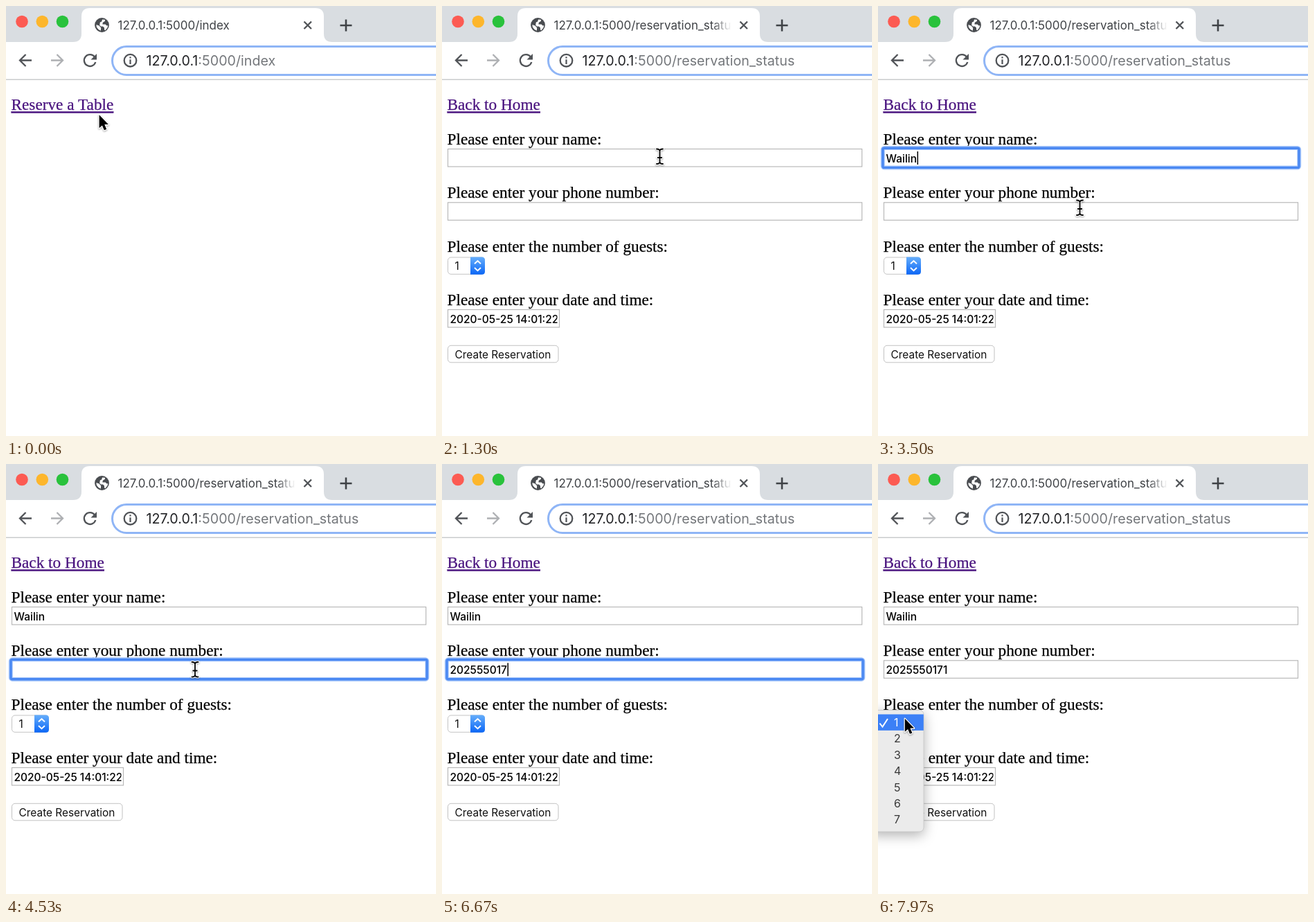
Recreate the animation shown at these times as an HTML page. Size 621 px wide and 621 px high, loop 8000 ms.

```html
<!DOCTYPE html>
<html lang="en">
<head>
<meta charset="utf-8">
<title>Reservation form</title>
<style>
  html, body { margin: 0; width: 100%; height: 100%; overflow: hidden; background: #fff; }
  svg { display: block; width: 100%; height: 100%; }
  text { white-space: pre; }
  .ui { font-family: Inter, "Open Sans", sans-serif; font-size: 15.4px; fill: #111; }
  .entry { font-size: 15.5px; font-weight: 500; fill: #000; }
  .page { font-family: "Liberation Serif", "Times New Roman", serif; font-size: 23.27px; fill: #000; stroke: #000; stroke-width: .25; }
  .link { fill: #4a147f; stroke: #4a147f; text-decoration: underline 1.5px; }
  .title { font-size: 17px; fill: #3f4246; }
  .url { font-size: 19.7px; fill: #202124; }
  .icon { fill: none; stroke: #505357; stroke-width: 2.3; }
  .field { fill: #fff; stroke: #b9b9b9; stroke-width: 1.2; }
  .menu text { font-size: 16px; fill: #3a3a3a; }
  .menu .panel { filter: drop-shadow(0 5px 9px rgba(0,0,0,.3)); }
  #cursor { filter: drop-shadow(0 1.5px 1.2px rgba(0,0,0,.35)); }
</style>
</head>
<body>
<svg viewBox="0 0 621 621" xmlns="http://www.w3.org/2000/svg">
  <defs>
    <linearGradient id="fade"><stop offset="0" stop-color="#fff" stop-opacity="0"/><stop offset=".5" stop-color="#fff"/></linearGradient>
    <linearGradient id="blue" x2="0" y2="1"><stop offset="0" stop-color="#66aefb"/><stop offset="1" stop-color="#0b66f6"/></linearGradient>
    <clipPath id="dateClip"><rect x="11" y="440" width="155.5" height="23"/></clipPath>
  </defs>
  <rect width="621" height="621" fill="#fff"/>

  <!-- tab strip -->
  <rect width="621" height="52" fill="#d9dde1"/>
  <circle cx="23" cy="22.5" r="8.8" fill="#fc5b53"/>
  <circle cx="52.3" cy="22.5" r="8.8" fill="#fdb62c"/>
  <circle cx="81.5" cy="22.5" r="8.8" fill="#29c23c"/>
  <path d="M97 52q12 0 12-12V15q0-12 12-12H447q12 0 12 12V40q0 12 12 12z" fill="#fff"/>
  <circle cx="138.5" cy="27.5" r="10.4" fill="#494c50"/>
  <path d="M139 19.5l4 .3-.2 2.2-3 1.8-.4 2.6h4.2l2 2 1.6-.4-.6 3-3 4-1.6-.4v-3l-2-2.2h-3l-1.8-2 .6-3.8 2.4-1.2zM130.4 27l4.2 1.6 2.6 3-.4 4.2-3.4-2-2.6-3.4z" fill="#fff"/>
  <text id="tabTitle" class="ui title" x="161.5" y="33.7"></text>
  <rect x="390" y="14" width="56" height="28" fill="url(#fade)"/>
  <path class="icon" d="M430.5 22.5l10.5 10.5m0-10.5l-10.5 10.5"/>
  <path class="icon" style="stroke:#3f4246;stroke-width:2.6" d="M482.5 28h17m-8.5-8.5v17"/>

  <!-- toolbar -->
  <path class="icon" d="M37 78.5H20m8.5-8.5L20 78.5l8.5 8.5"/>
  <path class="icon" style="stroke:#aeb0b3" d="M65 78.5h17m-8.5-8.5l8.5 8.5-8.5 8.5"/>
  <path class="icon" d="M128 73.5a8.4 8.4 0 1 0 1.3 7.5"/>
  <path d="M131 69v8.5h-8.5z" fill="#505357"/>
  <rect x="153.5" y="58.5" width="520" height="41" rx="20.5" fill="#fff" stroke="#8fb5f6" stroke-width="3"/>
  <circle class="icon" cx="179.5" cy="78.7" r="8.8"/>
  <path d="M178.4 73.3h2.2v2.3h-2.2zM178.4 77.3h2.2v6.7h-2.2z" fill="#505357"/>
  <text class="ui url" x="202.5" y="86">127.0.0.1<tspan id="urlPath" fill="#74777b"></tspan></text>
  <rect y="105.5" width="621" height="1.5" fill="#c9cbcd"/>

  <text id="link" class="page link" x="7.5" y="150.3"></text>

  <g id="form">
    <text class="page" x="7.5" y="200">Please enter your name:</text>
    <text class="page" x="7.5" y="277.3">Please enter your phone number:</text>
    <text class="page" x="7.5" y="354.6">Please enter the number of guests:</text>
    <text class="page" x="7.5" y="431.9">Please enter your date and time:</text>
    <rect class="field" x="8.5" y="206.5" width="598" height="25.5"/>
    <rect class="field" x="8.5" y="283.8" width="598" height="25.5"/>
    <rect class="field" x="8.5" y="438.5" width="161" height="25.5"/>
    <g id="ring" fill="none">
      <rect x="6.8" y="205" width="601.4" height="28.6" rx="2.5" stroke="#a9c8fa" stroke-width="6"/>
      <rect x="7" y="205.2" width="601" height="28.2" rx="2" stroke="#4a88f2" stroke-width="3.4"/>
    </g>
    <text id="name" class="ui entry" x="11.5" y="226"></text>
    <text id="phone" class="ui entry" x="11.5" y="303.3"></text>
    <rect id="caret" width="1.5" height="19" fill="#000"/>
    <text class="ui entry" x="11.5" y="458" clip-path="url(#dateClip)">2020-05-25 14:01:22</text>

    <rect x="8.5" y="363" width="53" height="24.3" rx="4.5" fill="#fff" stroke="#c4c4c4"/>
    <path d="M41 362.5h16.5q4.5 0 4.5 4.5v16.3q0 4.5-4.5 4.5H41z" fill="url(#blue)"/>
    <path d="M47 372.3l4.5-4.3 4.5 4.3M47 378l4.5 4.3 4.5-4.3" fill="none" stroke="#fff" stroke-width="1.9"/>
    <text class="ui" x="18.5" y="381">1</text>

    <rect x="8.5" y="490.3" width="159.5" height="24.5" rx="4.5" fill="#fff" stroke="#c2c2c2"/>
    <text class="ui" x="18.6" y="508.7">Create Reservation</text>
  </g>

  <g id="menu" class="menu">
    <rect class="panel" x="-12" y="355.5" width="78" height="175.5" rx="6" fill="#ebebeb" stroke="#c6c6c6" stroke-width=".8"/>
    <rect y="361.5" width="65.8" height="23.3" fill="#3c80f6"/>
    <path d="M2.5 374.5l4 5L14 368" fill="none" stroke="#fff" stroke-width="2"/>
  </g>

  <g id="cursor">
    <path id="arrow" d="M0 0V19L4.3 15.2 7.2 22 10.6 20.6 7.7 13.8H13.3Z" stroke="#fff" stroke-width="2.6" stroke-linejoin="round" paint-order="stroke"/>
    <g id="beam" fill="none" stroke-linecap="round">
      <path id="beamShape" d="M-4.5-10.5Q0-10.5 0-7.5Q0-10.5 4.5-10.5M0-8V8M-4.5 11Q0 11 0 8Q0 11 4.5 11M-2.8 2H2.8" stroke="#fff" stroke-width="4"/>
      <path d="M-4.5-10.5Q0-10.5 0-7.5Q0-10.5 4.5-10.5M0-8V8M-4.5 11Q0 11 0 8Q0 11 4.5 11M-2.8 2H2.8" stroke="#000" stroke-width="1.8"/>
    </g>
    <path id="hand" d="M-2 1Q0-2 2 1V8Q4 6 6 8.5Q8.5 7 10 9.5Q13 9 13 12V16Q13 19 11 21V24H0V21L-7 13Q-8 9-7 11Q-5 9-2 13Z" fill="#fff" stroke="#000" stroke-width="1.5" stroke-linejoin="round"/>
  </g>
</svg>

<script>
const LOOP = 8000;
const PRESS = 290, NAVIGATE = 400, OPEN_MENU = 7750;
const fields = [
  { id: 'name', text: 'Wailin', focus: 1540, blur: 4010, start: 2300, step: 160, top: 206 },
  { id: 'phone', text: '2025550171', focus: 4010, blur: OPEN_MENU, start: 4800, step: 230, top: 283.3 }
];
// time, x, y
const track = [
  [0, 134.6, 157.3], [60, 134.6, 157.3], [220, 126, 146], [410, 126, 146],
  [730, 276.6, 161.3], [1250, 314.5, 217], [3340, 314.5, 217],
  [3500, 291.5, 291], [3680, 273, 296.5], [7020, 273, 296.5],
  [7300, 140, 408], [7560, 38.8, 367.8], [LOOP, 38.8, 367.8]
];
const hidden = [[2300, 3340], [4800, 7020]];
const linkBox = [7, 131, 155, 155];
const textBoxes = [
  [8, 181, 230, 206], [8, 206, 607, 233], [8, 258, 314, 283],
  [8, 283, 607, 310], [8, 336, 326, 360], [8, 413, 305, 438]
];

const $ = id => document.getElementById(id);
const show = (id, on) => { $(id).style.display = on ? '' : 'none'; };
const put = (id, text) => { if ($(id).textContent !== text) $(id).textContent = text; };
const within = (x, y) => ([l, t, r, b]) => x >= l && x <= r && y >= t && y <= b;

for (let n = 1; n <= 7; n++) {
  const item = document.createElementNS('http://www.w3.org/2000/svg', 'text');
  item.setAttribute('class', 'ui');
  item.setAttribute('x', 23);
  item.setAttribute('y', 379 + (n - 1) * 23.4);
  if (n === 1) item.style.fill = '#fff';
  item.textContent = n;
  $('menu').append(item);
}

function pointerAt(t) {
  const i = track.findIndex(p => p[0] > t);
  const [t0, x0, y0] = track[i - 1], [t1, x1, y1] = track[i];
  const u = (t - t0) / (t1 - t0), k = u * u * (3 - 2 * u);
  return [x0 + (x1 - x0) * k, y0 + (y1 - y0) * k];
}

function drawFields(t) {
  const active = fields.find(f => t >= f.focus && t < f.blur);
  show('ring', active);
  for (const f of fields) {
    f.count = Math.max(0, Math.min(f.text.length, Math.floor((t - f.start) / f.step) + 1));
    put(f.id, f.text.slice(0, f.count));
  }
  if (!active) return show('caret', false);
  const { id, top, count, focus, start, step } = active;
  const lastKey = count ? start + (count - 1) * step : focus;
  show('caret', (t - lastKey) % 1000 < 500);
  $('ring').setAttribute('transform', `translate(0 ${top - 206})`);
  $('caret').setAttribute('x', 12 + (count ? $(id).getComputedTextLength() : 0));
  $('caret').setAttribute('y', top + 4);
}

function drawCursor(t, onForm) {
  const [x, y] = pointerAt(t), hit = within(x, y);
  const kind = hit(linkBox) ? 'hand' : onForm && textBoxes.some(hit) ? 'beam' : 'arrow';
  for (const id of ['arrow', 'beam', 'hand']) show(id, id === kind);
  show('cursor', !hidden.some(([a, b]) => t >= a && t < b));
  $('cursor').setAttribute('transform', `translate(${x} ${y})`);
}

function render(t) {
  const onForm = t >= NAVIGATE;
  const path = ':5000/' + (onForm ? 'reservation_status' : 'index');
  const pressed = t >= PRESS && !onForm;
  put('tabTitle', '127.0.0.1' + path);
  put('urlPath', path);
  put('link', onForm ? 'Back to Home' : 'Reserve a Table');
  $('link').style.fill = $('link').style.stroke = pressed ? '#e8200f' : '';
  show('form', onForm);
  show('menu', t >= OPEN_MENU);
  drawFields(t);
  drawCursor(t, onForm);
}

const begin = performance.now();
function tick() {
  render((performance.now() - begin) % LOOP);
  requestAnimationFrame(tick);
}
tick();
</script>
</body>
</html>
```
